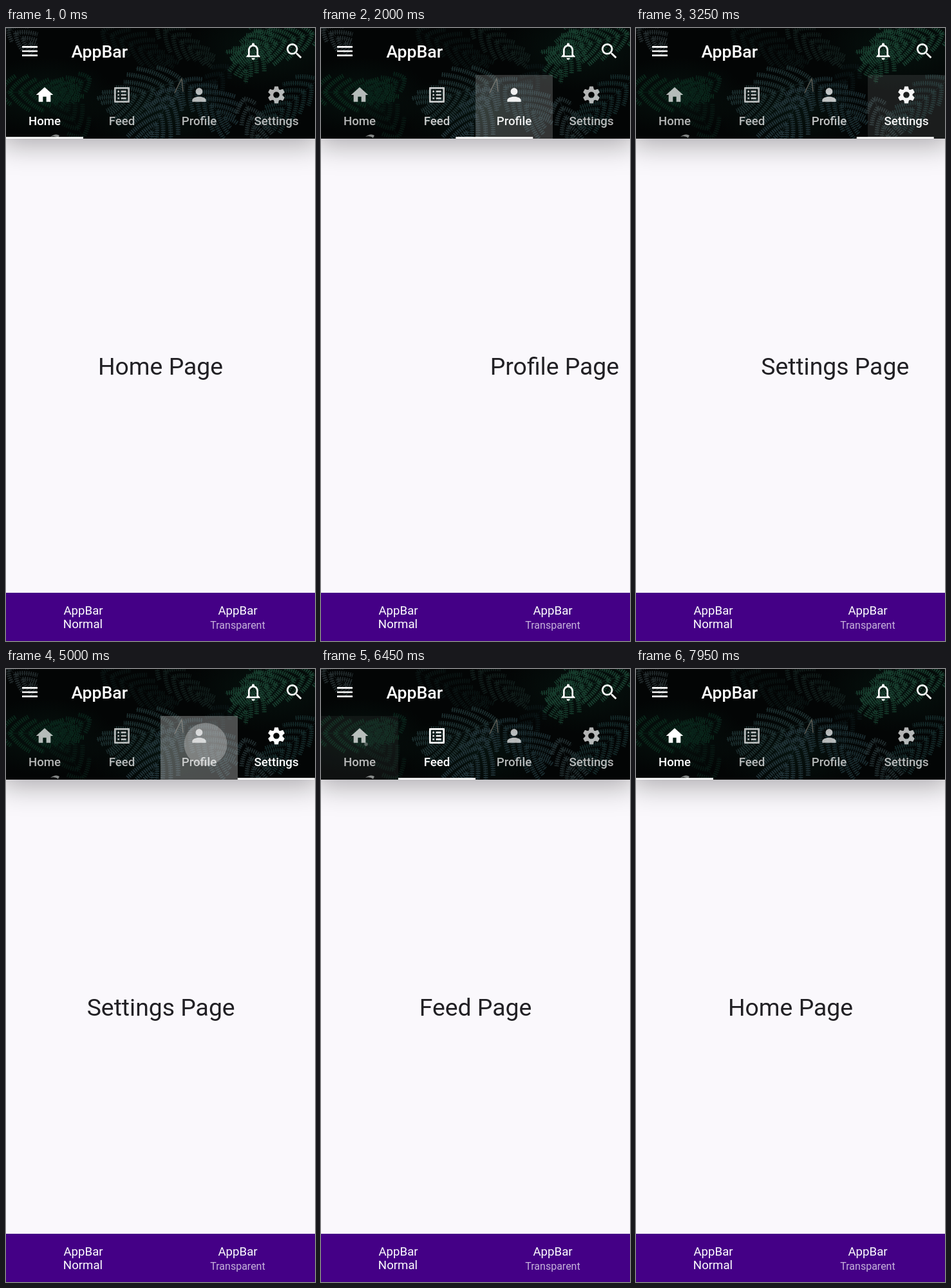
An HTML page for the animation above (8000 ms loop, 480 by 953 pixels).

```html
<!DOCTYPE html>
<html lang="en">
<head>
<meta charset="utf-8">
<title>Tabbed app bar</title>
<style>
  html, body { margin: 0; width: 100%; height: 100%; overflow: hidden; background: #faf8fc; }
  svg { display: block; width: 100%; height: 100%; }
  text { font-family: Roboto, sans-serif; text-anchor: middle; }
  .page { font-size: 37.33px; fill: #212024; }
  .label { font-size: 18.67px; fill: #fff; }
  .strong { font-weight: 500; }
</style>
</head>
<body>
<svg id="stage" viewBox="0 0 480 953" preserveAspectRatio="none">
  <defs>
    <filter id="blur" x="-20%" y="-80%" width="140%" height="260%"><feGaussianBlur stdDeviation="22"/></filter>
    <radialGradient id="glow"><stop offset="0" stop-color="#0f3a2b" stop-opacity=".25"/><stop offset="1" stop-color="#0f3a2b" stop-opacity="0"/></radialGradient>
    <clipPath id="barClip"><rect width="480" height="172"/></clipPath>
    <clipPath id="inkClip"><rect id="inkBounds" y="73" width="120" height="99"/></clipPath>
  </defs>
  <rect width="480" height="953" fill="#faf8fc"/>
  <g id="pages"></g>
  <rect x="-8" y="-12" width="496" height="194" fill-opacity=".32" filter="url(#blur)"/>
  <g clip-path="url(#barClip)">
    <rect width="480" height="172" fill="#030505"/>
    <ellipse cx="60" cy="105" rx="110" ry="60" fill="url(#glow)"/>
    <ellipse cx="410" cy="30" rx="130" ry="70" fill="url(#glow)"/>
    <ellipse cx="240" cy="130" rx="120" ry="60" fill="url(#glow)"/>
    <g id="ferns" fill="none"></g>
    <path d="M262 101Q270 84 273 79l2 20" fill="none" stroke="#68645a" stroke-width="1.2"/>
    <path d="M69 169q8-6 14-2l-2 4q-5-4-12-2z" fill="#858887"/>
  </g>
  <g id="ink" clip-path="url(#inkClip)">
    <rect id="highlight" y="73" width="120" height="99" fill="#bcbcbc"/>
    <circle id="splash" fill="#c8c8c8"/>
  </g>
  <g id="tabs"></g>
  <rect id="indicator" y="169.3" width="120" height="2.7" fill="#fff"/>
  <g id="actions" fill="#fff"></g>
  <text x="145.3" y="46" class="strong" font-size="26.67" fill="#fff">AppBar</text>
  <rect y="878" width="480" height="75" fill="#440086"/>
  <text x="120" y="912" class="label">AppBar</text>
  <text x="119.5" y="933.3" class="label">Normal</text>
  <text x="360" y="912" class="label">AppBar</text>
  <text x="360" y="934" font-size="16" fill="#fff" fill-opacity=".7">Transparent</text>
</svg>
<script>
const LOOP = 8000, WIDTH = 480, TAB = 120;
const $ = id => document.getElementById(id);
const clamp = v => Math.max(0, Math.min(1, v));
const path = d => `<path d="${d}"/>`;

const gear = '<circle cx="12" cy="12" r="5.4" fill="none" stroke="#fff" stroke-width="3.6"/>' +
  [0, 60, 120, 180, 240, 300].map(a =>
    `<path transform="rotate(${a} 12 12)" d="M9.4 6L10.2 2.5h3.6L14.6 6z" stroke="#fff" stroke-width=".8" stroke-linejoin="round"/>`).join('');

const tabs = [
  ['Home', path('M10 20v-6h4v6h5v-8h3L12 3 2 12h3v8z')],
  ['Feed', path('M19 5v14H5V5h14m1.1-2H3.9c-.5 0-.9.4-.9.9v16.2c0 .4.4.9.9.9h16.2c.4 0 .9-.5.9-.9V3.9c0-.5-.5-.9-.9-.9zM11 7h6v2h-6zm0 4h6v2h-6zm0 4h6v2h-6zM7 7h2v2H7zm0 4h2v2H7zm0 4h2v2H7z')],
  ['Profile', path('M12 12c2.21 0 4-1.79 4-4s-1.79-4-4-4-4 1.79-4 4 1.79 4 4 4zm0 2c-2.67 0-8 1.34-8 4v2h16v-2c0-2.66-5.33-4-8-4z')],
  ['Settings', gear]
];

const icon = (cx, cy, shape) => `<g transform="translate(${cx - 16} ${cy - 16}) scale(1.3333)">${shape}</g>`;

$('pages').innerHTML = tabs.map(([name], i) =>
  `<text class="page" x="${WIDTH * (i + .5)}" y="538.8">${name} Page</text>`).join('');
$('tabs').innerHTML = tabs.map(([name, shape], i) => {
  const cx = TAB * (i + .5);
  return `<g fill="#fff">${icon(cx, 104, shape)}<text class="label strong" x="${cx}" y="150.7">${name}</text></g>`;
}).join('');
$('actions').innerHTML =
  icon(37, 36, path('M3 18h18v-2H3zm0-5h18v-2H3zm0-7v2h18V6z')) +
  icon(384, 36, path('M12 22c1.1 0 2-.9 2-2h-4c0 1.1.9 2 2 2zm6-6v-5c0-3.07-1.63-5.64-4.5-6.32V4c0-.83-.67-1.5-1.5-1.5s-1.5.67-1.5 1.5v.68C7.64 5.36 6 7.92 6 11v5l-2 2v1h16v-1zm-2 1H8v-6c0-2.48 1.51-4.5 4-4.5s4 2.02 4 4.5z')) +
  icon(448, 36, path('M15.5 14h-.79l-.28-.27C15.41 12.59 16 11.11 16 9.5 16 5.91 13.09 3 9.5 3S3 5.91 3 9.5 5.91 16 9.5 16c1.61 0 3.09-.59 4.23-1.57l.27.28v.79l5 4.99L20.49 19zm-6 0C7.01 14 5 11.99 5 9.5S7.01 5 9.5 5 14 7.01 14 9.5 11.99 14 9.5 14z'));

// A frond is a stem with paired side stalks; dashes across each stalk read as leaflets.
function frond([x, y, degrees, length, spread, color]) {
  const angle = degrees * Math.PI / 180, pairs = Math.round(length / 15);
  const dx = Math.cos(angle), dy = Math.sin(angle);
  let stalks = '';
  for (let k = 0; k <= pairs; k++) {
    const u = k / pairs, px = x + dx * length * u, py = y + dy * length * u;
    for (const side of [-1, 1]) {
      const reach = spread * Math.sin(Math.PI * (.25 + .6 * u)) * (1 + .2 * Math.sin(k * 5 + side + x));
      const a = angle + side * (1.05 - .5 * u), bend = a - side * .25;
      stalks += `M${px} ${py}q${reach * .5 * Math.cos(a)} ${reach * .5 * Math.sin(a)} ${reach * Math.cos(bend)} ${reach * Math.sin(bend)}`;
    }
  }
  return `<g stroke="${color}"><path d="${stalks}" stroke-width="7" stroke-dasharray="1.6 1.8"/>` +
    `<path d="M${x} ${y}l${dx * length} ${dy * length}${stalks}" stroke-width=".7"/></g>`;
}

$('ferns').innerHTML = [
  [150, 5, 25, 110, 36, '#0a1413'],
  [235, -5, 35, 90, 34, '#111d1b'],
  [120, 170, -120, 80, 40, '#081813'],
  [345, 60, 130, 60, 34, '#0a1415'],
  [-10, 100, 0, 110, 42, '#0a2a1c'],
  [130, 78, 155, 70, 34, '#09231a'],
  [-8, -8, 35, 55, 30, '#242d2f'],
  [272, 80, 160, 105, 58, '#1e3132'],
  [262, 95, 118, 75, 55, '#22343a'],
  [276, 82, 42, 85, 52, '#1b2d31'],
  [485, 80, 140, 100, 44, '#152a2a'],
  [370, 110, 70, 60, 36, '#222e30'],
  [400, -10, 110, 80, 44, '#163a2b'],
  [490, 5, 165, 130, 44, '#194030']
].map(frond).join('');

// Each tap: tab index, press time, release time.
const taps = [
  [1, 520, 790], [2, 1560, 1867], [3, 2780, 3083],
  [2, 4640, 5000], [1, 5560, 5900], [0, 6420, 6790]
].map(([tab, down, up]) => ({ tab, down, up }));

// cubic-bezier(.25, .1, .25, 1)
function ease(x) {
  if (x <= 0 || x >= 1) return clamp(x);
  const bezier = (a, b, s) => 3 * a * s * (1 - s) ** 2 + 3 * b * s * s * (1 - s) + s ** 3;
  let low = 0, high = 1;
  for (let i = 0; i < 24; i++) {
    const mid = (low + high) / 2;
    if (bezier(.25, .25, mid) < x) low = mid; else high = mid;
  }
  return bezier(.1, 1, low);
}

function drawInk(t) {
  const tap = taps.find(({ down, up }) => t >= down && t < up + 200);
  $('ink').style.display = tap ? '' : 'none';
  if (!tap) return;
  const { tab, down, up } = tap, left = tab * TAB;
  const held = Math.min(t, up) - down, since = Math.max(0, t - up);
  const grown = held / 1000, fullRadius = 89;
  $('inkBounds').setAttribute('x', left);
  $('highlight').setAttribute('x', left);
  $('highlight').setAttribute('fill-opacity', .4 * clamp(clamp(held / 200) - since / 200));
  $('splash').setAttribute('cx', left + 70);
  $('splash').setAttribute('cy', 117);
  $('splash').setAttribute('r', fullRadius * Math.min(1, grown + since / 67));
  $('splash').setAttribute('fill-opacity', .4 * (1 - since / 200));
}

function draw(t) {
  let position = 0;
  for (const { tab, up } of taps) position += (tab - position) * ease((t - up) / 300);
  $('pages').setAttribute('transform', `translate(${-WIDTH * position})`);
  $('indicator').setAttribute('x', TAB * position);
  [...$('tabs').children].forEach((tab, i) =>
    tab.setAttribute('opacity', .7 + .3 * clamp(1 - Math.abs(position - i))));
  drawInk(t);
}

const start = performance.now();
function tick() {
  draw((performance.now() - start) % LOOP);
  requestAnimationFrame(tick);
}
tick();
</script>
</body>
</html>
```
